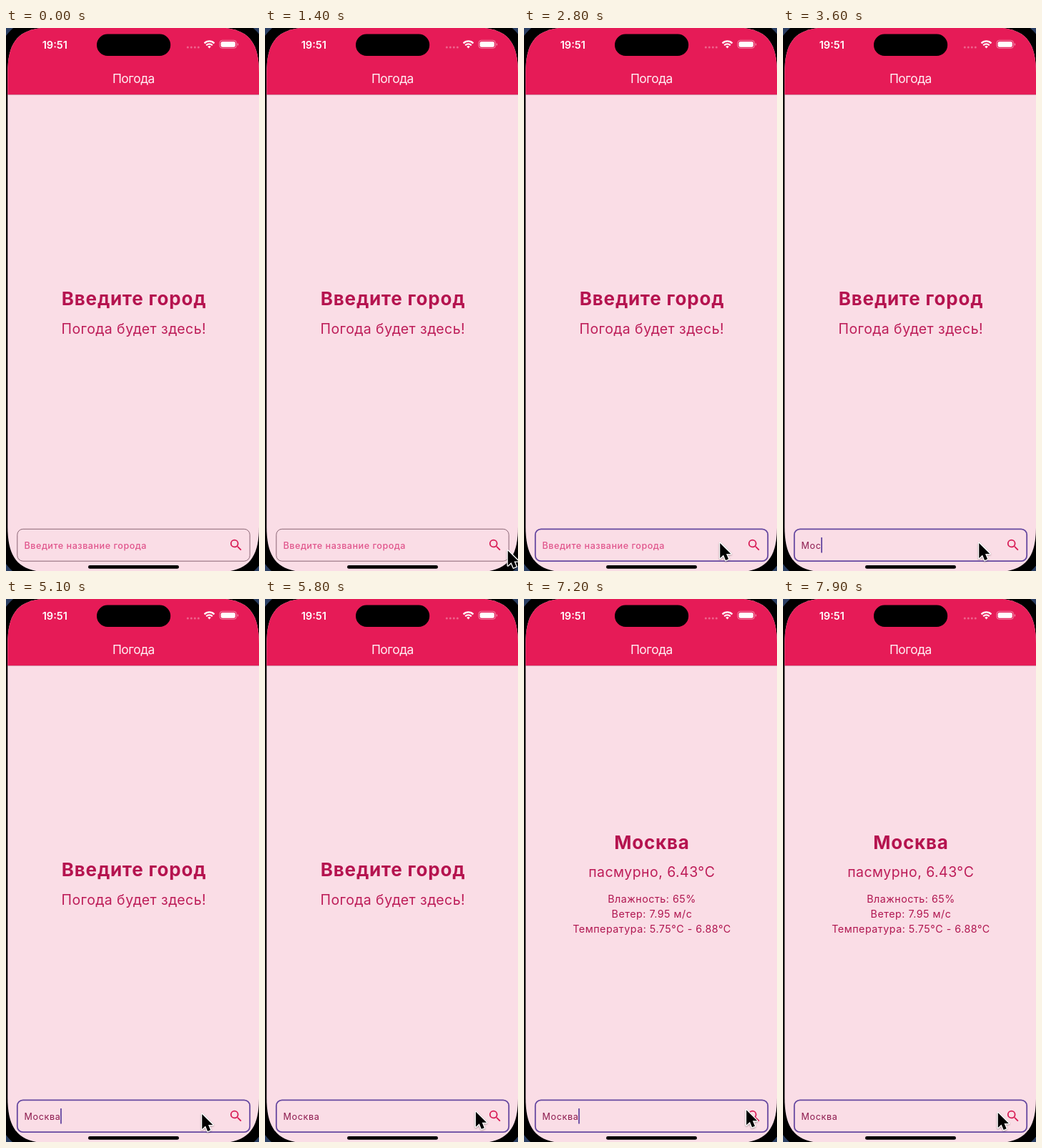
Write an HTML page that moves like this. It is 354 px wide and 760 px high and loops after 8 s.

```html
<!DOCTYPE html>
<html lang="ru">
<head>
<meta charset="utf-8">
<style>
  html, body { margin: 0; width: 100%; height: 100%; overflow: hidden; background: #2b3f63; }
  svg { display: block; width: 100%; height: 100%; font-family: Inter, "Noto Sans", sans-serif; }
  .mid { text-anchor: middle; }
  .head { font-size: 26px; font-weight: 700; letter-spacing: .8px; fill: #b5134f; }
  .sub { font-size: 19.5px; letter-spacing: .45px; fill: #bd1c58; }
  .info { font-size: 14.3px; letter-spacing: .5px; fill: #b01650; }
  .input { font-size: 12.6px; letter-spacing: .62px; }
  #hint { font-weight: 500; letter-spacing: .52px; }
  #mouse { filter: drop-shadow(0 1px 1px #0005); }
</style>
</head>
<body>
<svg viewBox="0 0 354 760">
  <clipPath id="screen">
    <path d="M2.3 63C2.3 16 19.3-1 66.3-1H290C337-1 354 16 354 63V698C354 745 337 762 290 762H66.3C19.3 762 2.3 745 2.3 698z"/>
  </clipPath>
  <rect x="-12" y="-15" width="380" height="791" rx="63"/>
  <g clip-path="url(#screen)">
    <rect width="354" height="762" fill="#fadde6"/>
    <rect y="-1" width="354" height="94" fill="#e61b57"/>
    <rect y="93" width="354" height="1" fill="#a03a5c" opacity=".45"/>
  </g>

  <rect x="127" y="8.6" width="103.2" height="30.4" rx="15.2"/>
  <text x="50.7" y="28.6" font-size="14.6" font-weight="600" fill="#fff">19:51</text>
  <g fill="#fff" opacity=".32">
    <circle cx="254.3" cy="27" r="1.5"/><circle cx="259.3" cy="27" r="1.5"/>
    <circle cx="264.3" cy="27" r="1.5"/><circle cx="269.3" cy="27" r="1.5"/>
  </g>
  <g fill="none" stroke="#fff" stroke-width="2.3">
    <path d="M277.6 21.4a9.6 9.6 0 0 1 13.8 0M280.2 24.2a6 6 0 0 1 8.6 0"/>
    <path d="M284.5 28.4l-2.3-2.4a3.3 3.3 0 0 1 4.6 0z" fill="#fff" stroke="none"/>
  </g>
  <rect x="299" y="17.3" width="23.5" height="11" rx="3.6" fill="none" stroke="#fff" stroke-opacity=".45"/>
  <rect x="300.6" y="18.9" width="20.3" height="7.8" rx="2.3" fill="#fff"/>
  <path d="M323.8 21v3.8a2 2 0 0 0 0-3.8z" fill="#fff" opacity=".5"/>
  <text class="mid" x="178.3" y="77" font-size="17.4" letter-spacing="-.45" fill="#fff0f4">Погода</text>

  <g id="prompt" class="mid">
    <text class="head" x="179" y="388">Введите город</text>
    <text class="sub" x="178.8" y="427.5">Погода будет здесь!</text>
  </g>
  <g id="weather" class="mid">
    <text class="head" x="179" y="349.5">Москва</text>
    <text class="sub" x="178.8" y="389">пасмурно, 6.43°C</text>
    <text class="info" x="179" y="424.5">Влажность: 65%</text>
    <text class="info" x="179" y="445.5">Ветер: 7.95 м/с</text>
    <text class="info" x="179" y="467">Температура: 5.75°C - 6.88°C</text>
  </g>

  <rect id="field" x="15.8" y="701.3" width="325.4" height="44.9" rx="8" fill="none"/>
  <text id="hint" class="input" x="25.5" y="728.5" fill="#e0558c">Введите название города</text>
  <text id="typed" class="input" x="25.5" y="728.5" fill="#8c1a4e"></text>
  <rect id="caret" y="713" width="1.8" height="21.5" fill="#6547a0"/>
  <path transform="translate(311.2 713) scale(.895)" fill="#d81b55" d="M15.5 14h-.79l-.28-.27A6.47 6.47 0 0 0 16 9.5 6.5 6.5 0 1 0 9.5 16c1.61 0 3.09-.59 4.23-1.57l.27.28v.79l5 4.99L20.49 19zm-6 0a4.5 4.5 0 1 1 0-9 4.5 4.5 0 0 1 0 9z"/>
  <rect x="115" y="752" width="127" height="4.8" rx="2.4"/>
  <g id="mouse">
    <path transform="scale(.94)" d="M0 0V22.3L5.1 17.6 8.4 25.6 12.6 23.8 9.3 16H16z" stroke="#fff" stroke-width="2.8" paint-order="stroke" stroke-linejoin="round"/>
  </g>
</svg>
<script>
  const LOOP = 8000, FOCUS = 1980, RESULT = 6900, WORD = 'Москва';
  const keys = [3080, 3380, 3580, 4080, 4580, 5080];
  // time, x, y of the pointer tip
  const path = [
    [1050, 363, 742], [1400, 339.8, 731.5], [1900, 274.3, 721],
    [5450, 274.3, 721], [6100, 311.2, 715.3],
    [7600, 311.2, 715.3], [7850, 300.8, 719]
  ];
  const $ = id => document.getElementById(id);
  const set = (id, name, value) => $(id).setAttribute(name, value);
  const show = (id, on) => set(id, 'opacity', +on);
  const clamp = v => Math.min(1, Math.max(0, v));

  function pointer(t) {
    let i = 0;
    while (i < path.length - 2 && t > path[i + 1][0]) i++;
    const [t0, x0, y0] = path[i], [t1, x1, y1] = path[i + 1];
    let k = clamp((t - t0) / (t1 - t0));
    if (i) k = k * k * (3 - 2 * k);
    return [x0 + (x1 - x0) * k, y0 + (y1 - y0) * k];
  }

  // Half a second on, half a second off, with a short fade
  function blink(age) {
    const p = age % 1000;
    if (p >= 500) return 1 - clamp((p - 500) / 100);
    return age < 500 ? 1 : clamp(p / 100);
  }

  function draw(t) {
    const count = keys.filter(k => k <= t).length;
    const focused = t >= FOCUS;
    $('typed').textContent = WORD.slice(0, count);
    show('hint', !count);
    show('prompt', t < RESULT);
    show('weather', t >= RESULT);
    show('mouse', t > path[0][0]);
    set('field', 'stroke', focused ? '#6547a0' : '#8a6675');
    set('field', 'stroke-width', focused ? 1.8 : 1);
    set('caret', 'x', 25.2 + (count ? $('typed').getComputedTextLength() : 0));
    set('caret', 'opacity', focused ? blink(t - (keys[count - 1] || FOCUS)) : 0);
    set('mouse', 'transform', `translate(${pointer(t)})`);
  }

  function frame() {
    draw(performance.now() % LOOP);
    requestAnimationFrame(frame);
  }
  frame();
</script>
</body>
</html>
```
